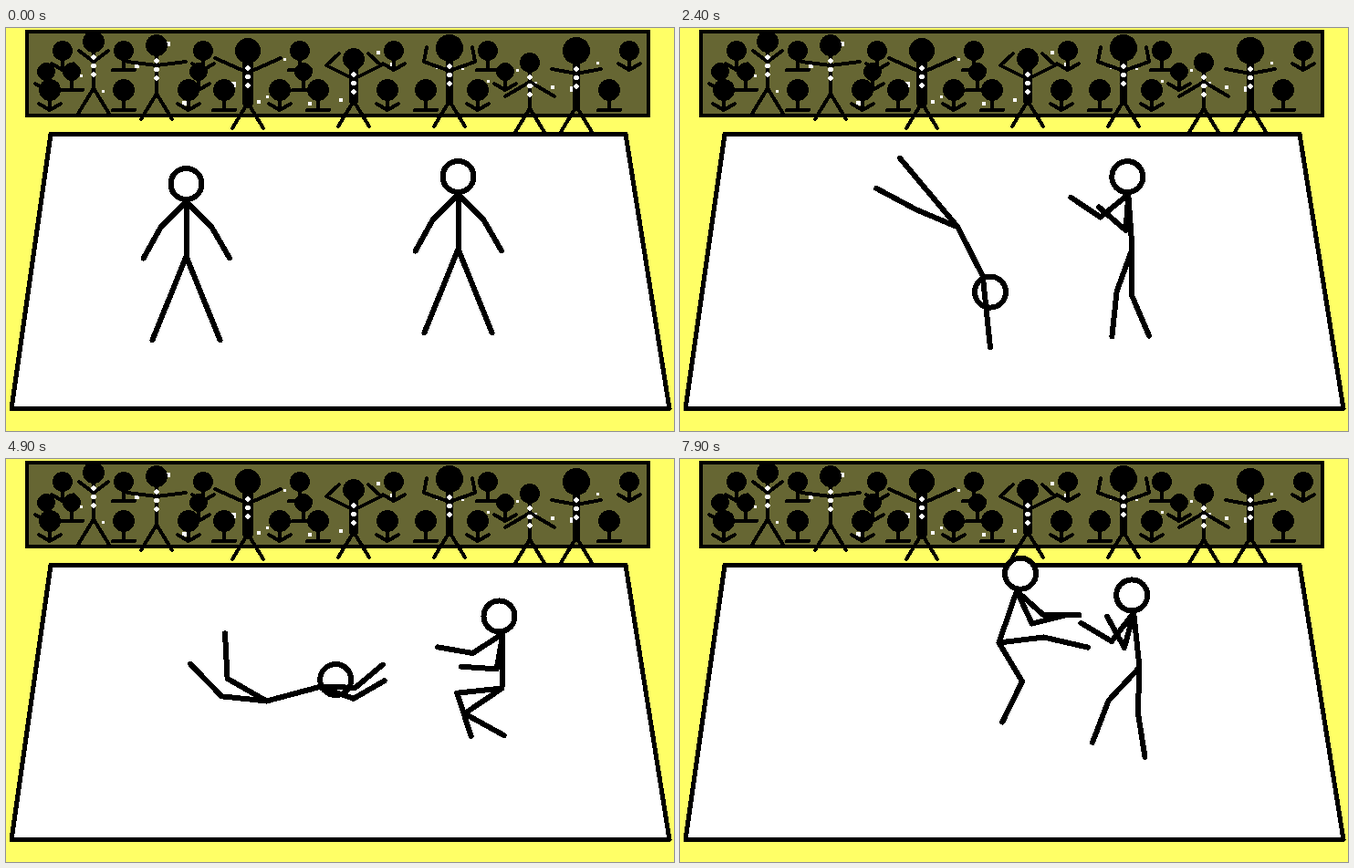
These frames come from a looping animation (732x442 px, 8 s). An HTML page:

```html
<!DOCTYPE html>
<html lang="en">
<head>
<meta charset="utf-8">
<title>Stick fight</title>
<style>
  html, body { margin: 0; width: 732px; height: 442px; overflow: hidden; background: #ff6; }
  svg { display: block; }
</style>
</head>
<body>
<svg width="732" height="442" viewBox="0 0 732 442" fill="none" stroke="#000"
     stroke-linecap="round" stroke-linejoin="round" shape-rendering="crispEdges">
  <rect x="23" y="4" width="681" height="92" fill="#663" stroke-width="4" stroke-linejoin="miter"/>
  <g id="crowd" stroke-width="4"></g>
  <path d="M49 116.5H679L727 417.5H6Z" fill="#fff" stroke-width="5"/>
  <g id="fighters" stroke-width="6" transform="translate(.5 .5)"></g>
</svg>
<script>
const LOOP = 8000, STEP = 100;
const crowd = document.getElementById('crowd');
const fighters = document.getElementById('fighters');

function add(parent, tag, attrs) {
  const el = document.createElementNS('http://www.w3.org/2000/svg', tag);
  for (const name in attrs) el.setAttribute(name, attrs[name]);
  return parent.appendChild(el);
}

const dot = (cx, cy, r, fill) => add(crowd, 'circle', { cx, cy, r, fill, stroke: 'none' });
const line = points => 'M' + points.map(p => p.map(v => v.toFixed(1))).join('L');

let seed = 7;
function random(min, max) {
  seed = (seed * 16807) % 2147483647;
  return min + (max - min) * seed / 2147483647;
}

function drawConfetti(count) {
  for (let i = 0; i < count; i++) {
    const size = Math.round(random(2, 6));
    add(crowd, 'rect', {
      x: Math.round(40 + (i + random(0, 1)) * 640 / count), y: Math.round(random(11, 86)),
      width: size, height: size, fill: '#fff', stroke: 'none'
    });
  }
}

// One row of seated spectators, arms alternately raised and level
function drawRow(y, r, xs) {
  xs.forEach((x, i) => {
    const lift = i % 2 ? 0 : 7, waist = y + r + 10;
    dot(x, y, r, '#000');
    add(crowd, 'path', {
      d: line([[x, y], [x, waist]]) + line([[x - 12, waist - lift], [x, waist], [x + 12, waist - lift]])
    });
  });
}

// A standing spectator; `arm` lists offsets from the shoulder, mirrored for the other side
function drawStanding(x, y, r, hip, width, arm) {
  const shoulder = y + r + 10;
  const reach = side => arm.map(([dx, dy]) => [x + side * dx, shoulder + dy]);
  dot(x, y, r, '#000');
  add(crowd, 'path', { d: line([[x, y + r], [x, hip]]), 'stroke-width': width });
  add(crowd, 'path', {
    d: line([...reach(-1).reverse(), [x, shoulder], ...reach(1)]) +
       line([[x - 17, hip + 28], [x, hip], [x + 17, hip + 28]])
  });
  for (let i = 0; i < 3; i++) dot(x, y + r + 5 + i * 9.5, 2.7, '#fff');
}

drawConfetti(27);
drawRow(25, 11, [62, 129, 216, 322, 425, 528, 683]);
drawRow(48, 10, [44, 72, 211, 326, 547]);
drawRow(68, 12, [48, 129, 200, 239, 300, 342, 418, 460, 517, 661]);
drawStanding(96, 15, 12, 66, 4, [[16, -12]]);
drawStanding(165, 19, 12, 72, 4, [[32, -4]]);
drawStanding(265, 25, 14, 82, 12, [[36, -16]]);
drawStanding(381, 34, 12, 80, 10, [[30, -15], [16, -28]]);
drawStanding(486, 22, 15, 80, 8, [[28, -10], [25, -26]]);
drawStanding(574, 38, 11, 88, 4, [[27, 16]]);
drawStanding(625, 25, 15, 86, 8, [[27, -5]]);

// Joints: hip, neck, head, elbow, hand, elbow, hand, knee, foot, knee, foot
const PARENT = [0, 0, 1, 1, 3, 1, 5, 0, 7, 0, 9];
const LENGTH = [0, 60, 19.5, 39.5, 39, 39.5, 39, 49.5, 49.5, 49.5, 49.5];

const mix = (a, b, k) => a + (b - a) * k;
// Degrees, by the shorter way round
const turn = (a, b, k) => a + (((b - a) % 360 + 540) % 360 - 180) * k;
const mirror = angles => angles.map(angle => 180 - angle);

// A pose has a hip position and bone angles in degrees: spine (torso, head), arms, legs
class Fighter {
  constructor(pose) {
    this.head = add(fighters, 'circle', { r: 17, fill: '#fff' });
    this.limbs = add(fighters, 'path', {});
    this.pose = pose;
    this.moves = [];
  }
  move(start, end, change) {
    const from = this.pose;
    this.pose = { ...from, ...change };
    this.moves.push({ start, end, from, to: this.pose });
    return this;
  }
  joints(time) {
    const { start, end, from, to } = this.moves.findLast(m => m.start <= time) || this.moves[0];
    const k = Math.min(1, Math.max(0, (time - start) / (end - start)));
    const angles = pose => [0, ...pose.spine, ...pose.arms, ...pose.legs];
    const target = angles(to), points = [];
    angles(from).forEach((angle, i) => {
      if (!i) return points.push(from.hip.map((v, axis) => mix(v, to.hip[axis], k)));
      const [x, y] = points[PARENT[i]], a = turn(angle, target[i], k) * Math.PI / 180;
      points.push([x + LENGTH[i] * Math.cos(a), y + LENGTH[i] * Math.sin(a)]);
    });
    return points;
  }
  draw(time) {
    const p = this.joints(time);
    const chain = (...ids) => line(ids.map(i => p[i]));
    this.limbs.setAttribute('d', chain(4, 3, 1, 5, 6) + chain(1, 0) + chain(8, 7, 0, 9, 10));
    this.head.setAttribute('cx', p[2][0]);
    this.head.setAttribute('cy', p[2][1]);
  }
}

const UPRIGHT = [-90, -90];
const HANGING = [135, 119, 45, 60], LOOSE = [114, 77, 66, 77], GUARD = [141, -146, 94, -139];
const APART = [112, 112, 68, 68], NARROW = [101, 94, 76, 87], WIDE = [120, 120, 62, 62];

const left = new Fighter({ hip: [197, 250], spine: UPRIGHT, arms: HANGING, legs: APART })
  .move(0, 200, { arms: LOOSE, legs: NARROW })
  .move(300, 600, { spine: [-88, -82], arms: mirror(GUARD) })
  .move(700, 1300, { legs: [117, 117, 65, 65] })
  .move(1600, 1700, { spine: [-53, -60], arms: [117, 57, 80, 58] })
  .move(1700, 1900, { hip: [215, 265], spine: [-38, -39], legs: [126, 118, 64, 106] })
  // Handspring
  .move(2000, 2400, { hip: [304, 218], spine: [63, 65], arms: [84, 84, 84, 84], legs: [203, 208, 230, 230] })
  .move(2400, 2600, { hip: [350, 214], spine: [95, 97], arms: [90, 90, 90, 90], legs: [-60, -72, -70, -84] })
  .move(2600, 2800, { hip: [350, 245], spine: [-84, -78], arms: mirror(GUARD), legs: [115, 105, 65, 90] })
  // Flying kick and landing
  .move(3000, 3500, { hip: [410, 190], spine: [-115, -106], legs: [66, 137, -12, -20] })
  .move(3500, 3900, { hip: [450, 226], spine: [-91, -96], arms: [29, -13, 69, 30], legs: [71, 123, 79, 124] })
  // Thrown on the floor
  .move(3900, 4300, { hip: [418, 232], spine: [-55, -49], legs: [111, 113, 82, 122] })
  .move(4400, 4900, { hip: [285, 265], spine: [-15, -24], arms: [1, -40, 19, -30], legs: [186, 226, 210, 267] })
  .move(4900, 5300, { hip: [292, 329], spine: [-14, -57], arms: [-13, -18, -13, -21], legs: [178, 184, 185, 181] })
  // Back up
  .move(7000, 7500, { hip: [318, 272], spine: [-58, -52], arms: mirror(GUARD), legs: [56, 136, 118, 159] })
  .move(7500, 7900, { hip: [349, 201], spine: [-71, -78], arms: [42, 0, 65, -14], legs: [-7, 13, 59, 116] });

const right = new Fighter({ hip: [495, 242], spine: UPRIGHT, arms: HANGING, legs: APART })
  .move(0, 200, { arms: LOOSE, legs: NARROW })
  .move(300, 600, { spine: [-94, -93], arms: GUARD })
  .move(700, 1300, { legs: [122, 122, 58, 58] })
  .move(1600, 1700, { arms: [140, 158, 60, 127] })
  .move(1700, 1900, { arms: GUARD })
  .move(2000, 2400, { legs: [110, 96, 91, 67] })
  // Knocked down
  .move(3400, 3700, { hip: [570, 250], spine: [-54, -49], arms: [151, 142, 112, 120], legs: [194, 196, 191, 162] })
  .move(3700, 3900, { hip: [543, 305], spine: [-49, -62], arms: [187, 260, 139, 264], legs: [218, 178, 226, 202] })
  .move(3900, 4300, { arms: [187, 203, 139, 203], legs: [205, 198, 198, 186] })
  .move(4400, 4900, { hip: [543, 251], spine: [-89, -102], arms: [147, 190, 100, 184], legs: [174, 72, 146, 29] })
  .move(4900, 5300, { hip: [520, 233], spine: [-93, -96], arms: GUARD, legs: APART })
  // Dive on the opponent
  .move(5300, 5800, { hip: [470, 280], spine: [-109, -111], legs: [137, 27, 42, 37] })
  .move(5900, 6300, { hip: [530, 284], spine: [177, 162], arms: [205, 253, 179, 226], legs: [5, -33, 20, -14] })
  .move(6300, 6900, { arms: [205, 194, 179, 190], legs: [6, -21, 20, -3] })
  .move(7000, 7900, { hip: [503, 228], spine: [-96, -96], arms: [128, -149, 105, -119], legs: [133, 111, 92, 81] });

const start = performance.now();

function render(now) {
  const elapsed = Math.max(0, now - start) % LOOP;
  const time = Math.floor(elapsed / STEP) * STEP;
  left.draw(time);
  right.draw(time);
  requestAnimationFrame(render);
}
render(start);
</script>
</body>
</html>
```
